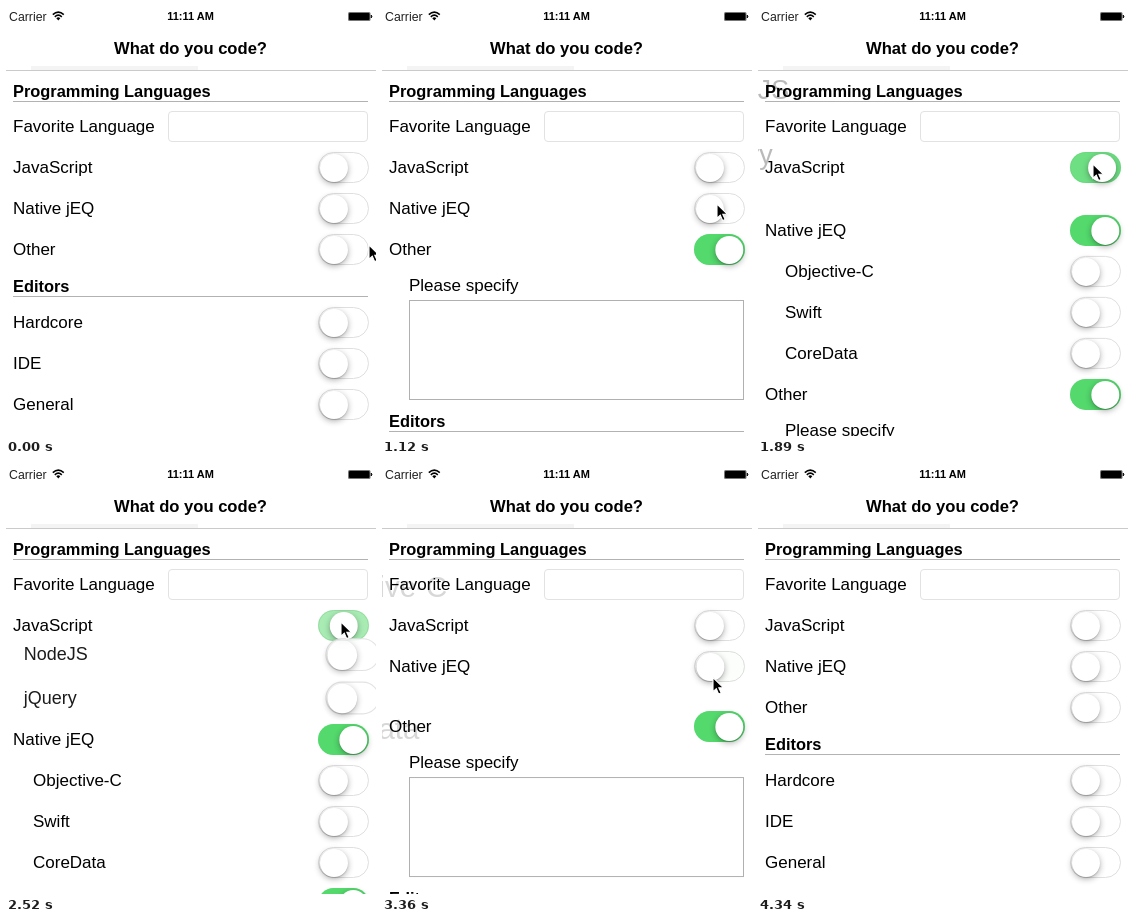
An HTML page that plays this animation: 370 by 430 pixels, repeating every 4620 ms.

```html
<!DOCTYPE html>
<html lang="en">
<head>
<meta charset="utf-8">
<title>What do you code?</title>
<style>
  html, body { margin: 0; width: 100%; height: 100%; overflow: hidden; background: #fff; }
  body { font: 17px "Liberation Sans", Arial, sans-serif; color: #000; }
  #stage { position: absolute; left: 0; top: 0; width: 370px; height: 430px; overflow: hidden; background: #fff; }
  #stage div, #stage svg { position: absolute; }
  #content { left: 0; top: 65px; width: 370px; height: 365px; overflow: hidden; }
  #page { left: 0; top: -65px; width: 370px; height: 430px; }
  .section, .group { left: 0; top: 0; width: 370px; height: 430px; }
  .group { transform-origin: 185px 407px; }
  .text { white-space: nowrap; line-height: 20px; height: 20px; margin-top: -9px; }
  .heading { font-weight: bold; font-size: 16.4px; }
  .title { font-weight: bold; font-size: 16.6px; }
  .rule { left: 7px; width: 355px; height: 1px; background: #b2b2b2; }
  .switch { left: 312px; width: 51px; height: 31px; margin-top: -15px; }
  .track, .fill { inset: 0; border-radius: 16px; box-sizing: border-box; }
  .track { border: 1px solid #dfdfdf; background: #fff; }
  .fill { background: #53d96c; opacity: 0; }
  .knob { left: 1.5px; top: 1.5px; width: 28px; height: 28px; border-radius: 50%; background: #fff;
    box-shadow: 0 2px 6px rgba(0,0,0,.32), 0 1px 1px rgba(0,0,0,.15); }
  .field { box-sizing: border-box; background: #fff; }
</style>
</head>
<body>
<div id="stage">
  <div id="content"><div id="page"></div></div>
  <div style="left:25px;top:60px;width:167px;height:4px;background:#f4f4f4"></div>
  <div style="left:0;top:64px;width:370px;height:1px;background:#cacaca"></div>
  <div class="text" style="left:3px;top:10px;font-size:12.3px;color:#222">Carrier</div>
  <div class="text" style="left:0;width:369px;top:9px;font-size:11px;font-weight:bold;text-align:center">11:11 AM</div>
  <div class="text title" style="left:0;width:369px;top:42px;text-align:center">What do you code?</div>
  <svg width="370" height="20" style="left:0;top:0" fill="none" stroke="#000">
    <path d="M46.8 8.6Q52.3 3.8 57.8 8.6M48.8 10.8Q52.3 7.6 55.8 10.8" stroke-width="1.6"/>
    <path d="M50.3 12.2Q52.3 10.4 54.3 12.2L52.3 14.4Z" fill="#000" stroke="none"/>
    <rect x="342" y="6" width="22.5" height="9" rx="1.5" fill="#777" stroke="none"/>
    <rect x="343" y="7" width="20.5" height="7" rx="1" fill="#000" stroke="none"/>
    <path d="M365.2 9Q366.7 10.5 365.2 12Z" fill="#000" stroke-width=".8"/>
  </svg>
  <svg id="cursor" width="16" height="22" viewBox="-2 -2 16 22" style="left:-2px;top:-2px">
    <path d="M0 0V14.2L3.3 11.2L5.7 16.6L8.2 15.5L5.8 10.2H10.3Z" fill="#000" stroke="#fff" stroke-width="1.1"/>
  </svg>
</div>
<script>
const LOOP = 4620, STEP = 70;

// Start times of each section's opening and closing; switches lead the content.
const sections = {
  js:     { rise: 82,  knob: [1730, 2433], body: [1830, 2485] },
  native: { rise: 123, knob: [1160, 3120], body: [1227, 3185] },
  other:  { rise: 135, knob: [470, 3960],  body: [602, 4025] },
};
const KNOB_MS = 300, BODY_MS = 320;

// time, x, y of the pointer tip
const pointer = [
  [0, 363, 239], [140, 335, 240], [470, 335, 240], [890, 335, 198],
  [1190, 335, 198], [1400, 335, 158], [2660, 335, 158], [2870, 331, 192],
  [3220, 331, 192], [3500, 331, 235], [4060, 331, 235], [4340, 376, 237],
];

function add(parent, className, style = {}, text = "") {
  const el = document.createElement("div");
  el.className = className;
  el.textContent = text;
  for (const key in style)
    el.style[key] = typeof style[key] === "number" ? style[key] + "px" : style[key];
  parent.append(el);
  return el;
}

const label = (parent, text, x, y) => add(parent, "text", { left: x, top: y }, text);

function heading(parent, text, y) {
  add(parent, "text heading", { left: 7, top: y }, text);
  add(parent, "rule", { top: y + 11 });
}

function row(parent, text, y, x = 7) {
  label(parent, text, x, y);
  const box = add(parent, "switch", { top: y });
  add(box, "track");
  return { fill: add(box, "fill"), knob: add(box, "knob") };
}

function section(parent, name, text, y) {
  const s = sections[name];
  s.toggle = row(parent, text, y);
  s.below = add(parent, "section");
  s.group = add(parent, "group");
  return s;
}

const page = document.getElementById("page");
heading(page, "Programming Languages", 84);
label(page, "Favorite Language", 7, 120);
add(page, "field", { left: 162, top: 105, width: 200, height: 31, border: "1px solid #e2e2e2", borderRadius: 4 });

const js = section(page, "js", "JavaScript", 161);
["NodeJS", "jQuery"].forEach((name, i) => row(js.group, name, 202 + 41 * i, 27));

const native = section(js.below, "native", "Native jEQ", 202);
["Objective-C", "Swift", "CoreData"].forEach((name, i) => row(native.group, name, 243 + 41 * i, 27));

const other = section(native.below, "other", "Other", 243);
label(other.group, "Please specify", 27, 279);
add(other.group, "field", { left: 27, top: 294, width: 335, height: 100, border: "1px solid #b0b0b0" });

heading(other.below, "Editors", 279);
["Hardcore", "IDE", "General"].forEach((name, i) => row(other.below, name, 316 + 41 * i));

// cubic-bezier(.25, .1, .25, 1)
function ease(x) {
  if (x <= 0) return 0;
  if (x >= 1) return 1;
  const curve = (u, a, b) => 3 * a * u * (1 - u) ** 2 + 3 * b * u * u * (1 - u) + u ** 3;
  let lo = 0, hi = 1;
  for (let i = 0; i < 20; i++) {
    const mid = (lo + hi) / 2;
    if (curve(mid, .25, .25) < x) lo = mid; else hi = mid;
  }
  return curve(lo, .1, 1);
}

const openness = (t, [on, off], ms) => ease((t - on) / ms) - ease((t - off) / ms);

function pointerAt(t) {
  const i = pointer.findIndex(p => p[0] > t);
  if (i < 0) return pointer[pointer.length - 1].slice(1);
  const [t0, x0, y0] = pointer[i - 1], [t1, x1, y1] = pointer[i];
  const u = (t - t0) / (t1 - t0), k = u * u * (3 - 2 * u);
  return [x0 + (x1 - x0) * k, y0 + (y1 - y0) * k];
}

const cursor = document.getElementById("cursor");

function render(t) {
  for (const s of Object.values(sections)) {
    const on = openness(t, s.knob, KNOB_MS), open = openness(t, s.body, BODY_MS);
    s.toggle.fill.style.opacity = on;
    s.toggle.knob.style.transform = `translateX(${19.3 * on}px)`;
    s.below.style.transform = `translateY(${s.rise * open}px)`;
    // Entering content recedes from twice its size, as seen in perspective.
    s.group.style.transform = open === 1 ? "none" : `scale(${1 / (1 - .5 * (1 - open))})`;
    s.group.style.opacity = open;
    s.group.style.visibility = open > 0 ? "visible" : "hidden";
  }
  const [x, y] = pointerAt(t);
  cursor.style.transform = `translate(${x}px, ${y}px)`;
}

const start = performance.now();
function tick() {
  const t = (performance.now() - start) % LOOP;
  render(Math.floor(t / STEP) * STEP);
  requestAnimationFrame(tick);
}
tick();
</script>
</body>
</html>
```
